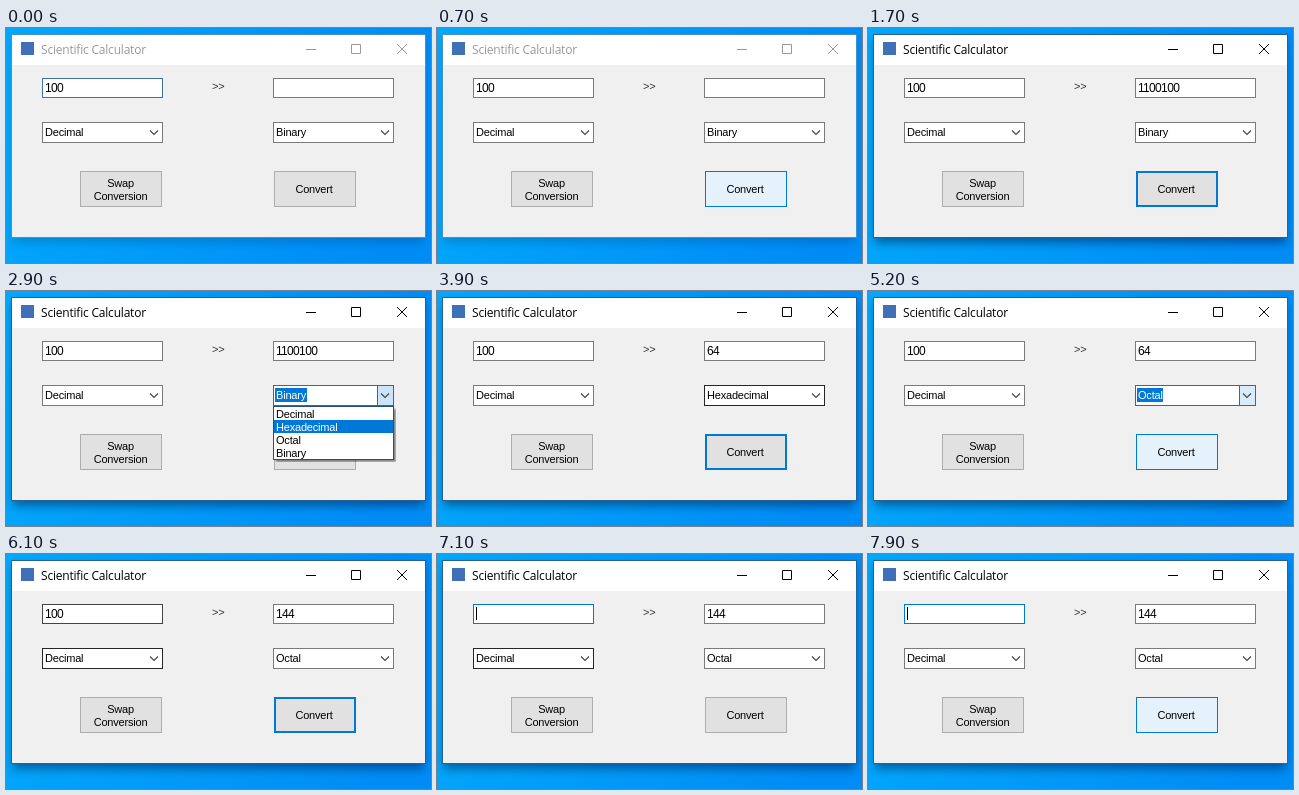
Recreate the animation shown at these times as an HTML page. Size 425 px wide and 235 px high, loop 8000 ms.

```html
<!DOCTYPE html>
<html lang="en">
<head>
<meta charset="utf-8">
<title>Scientific Calculator</title>
<style>
  html, body { margin: 0; width: 100%; height: 100%; overflow: hidden; }
  svg { display: block; }
  text { font: 11px "Liberation Sans", Arial, sans-serif; letter-spacing: -.2px; fill: #000; white-space: pre; }
  .title { font: 12px "Open Sans", "Noto Sans", sans-serif; letter-spacing: -.2px; }
  .value { font-size: 12px; letter-spacing: -.67px; }
  .mid { text-anchor: middle; }
  .white { fill: #fff; }
  rect { shape-rendering: crispEdges; }
  .soft { shape-rendering: auto; }
</style>
</head>
<body>
<svg id="stage" width="425" height="235" viewBox="0 0 425 235">
  <defs>
    <linearGradient id="sky" x1="0" y1="0" x2="1" y2=".15">
      <stop offset="0" stop-color="#03a8fb"/>
      <stop offset="1" stop-color="#008cf5"/>
    </linearGradient>
    <filter id="blur" x="-10%" y="-15%" width="120%" height="135%"><feGaussianBlur stdDeviation="5"/></filter>
    <filter id="blurSmall"><feGaussianBlur stdDeviation="1"/></filter>
  </defs>
</svg>
<script>
const LOOP = 8000;
const BLUE = '#0078d7', GRAY = '#7a7a7a', HOT = '#262626';
const stage = document.getElementById('stage');

function add(tag, attrs, parent = stage, content) {
  const el = document.createElementNS(stage.namespaceURI, tag);
  for (const key in attrs) el.setAttribute(key, attrs[key]);
  if (content) el.textContent = content;
  return parent.appendChild(el);
}
const group = (parent = stage) => add('g', {}, parent);
const fillBox = (x, y, width, height, fill, parent) => add('rect', { x, y, width, height, fill }, parent);
const frame = (x, y, w, h, fill, stroke, parent) =>
  add('rect', { x: x + .5, y: y + .5, width: w - 1, height: h - 1, fill, stroke }, parent);
const label = (x, y, str, cls = '', parent) => add('text', { x, y, class: cls }, parent, str);

// Hard steps: [[time, css values], ...]
function track(el, steps) {
  const keys = steps.map(([t, css]) => ({ offset: t / LOOP, easing: 'step-end', ...css }));
  keys.push({ ...keys[keys.length - 1], offset: 1 });
  el.animate(keys, { duration: LOOP, iterations: Infinity });
}
const prop = (el, name, steps) => track(el, steps.map(([t, v]) => [t, { [name]: v }]));
const shown = (el, steps) => prop(el, 'opacity', steps);
// Show one of several elements at a time
const pick = (els, steps) =>
  els.forEach((el, i) => shown(el, steps.map(([t, n]) => [t, n === i ? 1 : 0])));

// Desktop and window
fillBox(0, 0, 425, 235, 'url(#sky)');
const shadow = add('rect', { x: 7, y: 12, width: 411, height: 203, fill: '#002', filter: 'url(#blur)', class: 'soft' });
shown(shadow, [[0, .16], [1300, .28], [1400, .4]]);
const edge = frame(5, 6, 415, 204, '#f0f0f0', '#4a90c4');
prop(edge, 'stroke', [[0, '#4a90c4'], [1300, '#2b618e']]);
fillBox(6, 7, 413, 30, '#fff');
fillBox(15, 14, 13, 13, '#3f70b8');

const title = label(35, 26, 'Scientific Calculator', 'title');
prop(title, 'fill', [[0, '#999'], [1300, '#000']]);
const controls = add('path', {
  d: 'M300 21.5h10M345.5 16.5h9v9h-9zM391 16l10 10M401 16l-10 10', fill: 'none'
});
prop(controls, 'stroke', [[0, '#999'], [1300, '#000']]);

// Text boxes
const input = frame(36, 50, 121, 20, '#fff', GRAY);
prop(input, 'stroke', [[0, '#40719c'], [100, GRAY], [6100, '#444'], [6200, HOT], [6300, BLUE]]);
const typed = label(39, 64, '100', 'value');
shown(typed, [[0, 1], [7100, 0]]);
const marked = group();
fillBox(39, 53, 19, 14, BLUE, marked);
label(39, 64, '100', 'value white', marked);
shown(marked, [[0, 0], [6500, 1], [7100, 0]]);
shown(fillBox(58, 53, 1, 14, '#000'), [[0, 0], [6300, 1], [6500, 0]]);
shown(fillBox(39, 53, 1, 13, '#000'), [[0, 0], [7100, 1], [7400, 0], [7900, 1]]);

label(206, 62, '>>').style.fill = '#333';
frame(267, 50, 121, 20, '#fff', GRAY);
pick(['1100100', '64', '144'].map(s => label(270, 64, s, 'value')),
  [[0, -1], [1400, 0], [3700, 1], [5500, 2]]);

// Buttons
frame(74, 143, 82, 36, '#e1e1e1', '#adadad');
label(114.5, 159, 'Swap', 'mid');
label(114.5, 172, 'Conversion', 'mid');

const convert = frame(268, 143, 82, 36, '#e1e1e1', '#adadad');
const ring = frame(269, 144, 80, 34, 'none', BLUE);
label(308, 165, 'Convert', 'mid');
const looks = {
  idle: { fill: '#e1e1e1', stroke: '#adadad' },
  warm: { fill: '#e3e9ee', stroke: '#5793c2' },
  hot: { fill: '#e5f1fb', stroke: BLUE },
  down: { fill: '#cce4f7', stroke: '#005499' },
  focus: { fill: '#e1e1e1', stroke: BLUE }
};
const convertSteps = [
  [0, 'idle'], [400, 'hot'], [1300, 'down'], [1400, 'hot'], [1700, 'focus'], [2200, 'idle'],
  [3400, 'warm'], [3500, 'hot'], [3600, 'down'], [3700, 'hot'], [3900, 'focus'], [4100, 'idle'],
  [5200, 'hot'], [5400, 'down'], [5500, 'hot'], [5700, 'focus'], [6300, 'idle'],
  [7400, 'warm'], [7600, 'hot']
];
track(convert, convertSteps.map(([t, s]) => [t, looks[s]]));
shown(ring, convertSteps.map(([t, s]) => [t, s === 'focus' ? 1 : 0]));

// Combo boxes
const chevron = x => add('path', { d: `M${x - 4} 102.5l4 4l4 -4`, fill: 'none', stroke: '#444', 'stroke-width': 1.1 });

const from = frame(36, 94, 121, 21, '#fff', GRAY);
prop(from, 'stroke', [[0, GRAY], [5900, HOT], [6200, GRAY], [6800, HOT], [7200, GRAY]]);
label(39, 108, 'Decimal');
chevron(148);

const to = frame(267, 94, 121, 21, '#fff', GRAY);
prop(to, 'stroke', [[0, GRAY], [400, HOT], [700, GRAY], [2000, HOT], [2200, BLUE], [3400, GRAY],
  [3800, HOT], [4100, BLUE], [5300, GRAY]]);
const arrow = frame(371, 94, 17, 21, '#cce4f7', BLUE);
track(arrow, [[0, 0], [2200, 1], [3200, 1, '#e0eef9'], [3400, 0], [4100, 1], [5200, 1, '#d9eaf8'], [5300, 0]]
  .map(([t, opacity, fill = '#cce4f7']) => [t, { opacity, fill }]));
chevron(379);

const values = [[0, 0], [3000, 1], [4900, 2]];
const choices = [['Binary', 32], ['Hexadecimal', 62], ['Octal', 26]];
pick(choices.map(([s]) => label(270, 108, s)), values);
const chosen = group();
pick(choices.map(([s, w]) => {
  const g = group(chosen);
  fillBox(269, 97, w, 14, BLUE, g);
  label(270, 108, s, 'white', g);
  return g;
}), values);
shown(chosen, [[0, 0], [2200, 1], [3600, 0], [4100, 1], [5400, 0]]);

// Drop-down list
const list = group();
add('rect', { x: 270, y: 118, width: 120, height: 53, fill: '#000', opacity: .45, filter: 'url(#blurSmall)', class: 'soft' }, list);
frame(267, 115, 121, 54, '#fff', '#24527a', list);
const rows = ['Decimal', 'Hexadecimal', 'Octal', 'Binary'].map((s, i) => {
  const y = 116 + 13 * i;
  label(270, y + 11, s, '', list);
  const lit = group(list);
  fillBox(268, y, 119, 13, BLUE, lit);
  label(270, y + 11, s, 'white', lit);
  return lit;
});
pick(rows, [[0, 3], [2600, 2], [2900, 1], [4500, 0], [4600, 1], [4800, 2]]);
const open = { opacity: 1, clipPath: 'inset(0 0 0 0)' };
const half = { opacity: 1, clipPath: 'inset(0 0 50% 0)' };
const closed = { opacity: 0, clipPath: 'inset(0 0 0 0)' };
track(list, [[0, closed], [2300, half], [2400, open], [3100, closed], [4200, half], [4300, open], [5200, closed]]);
</script>
</body>
</html>
```
